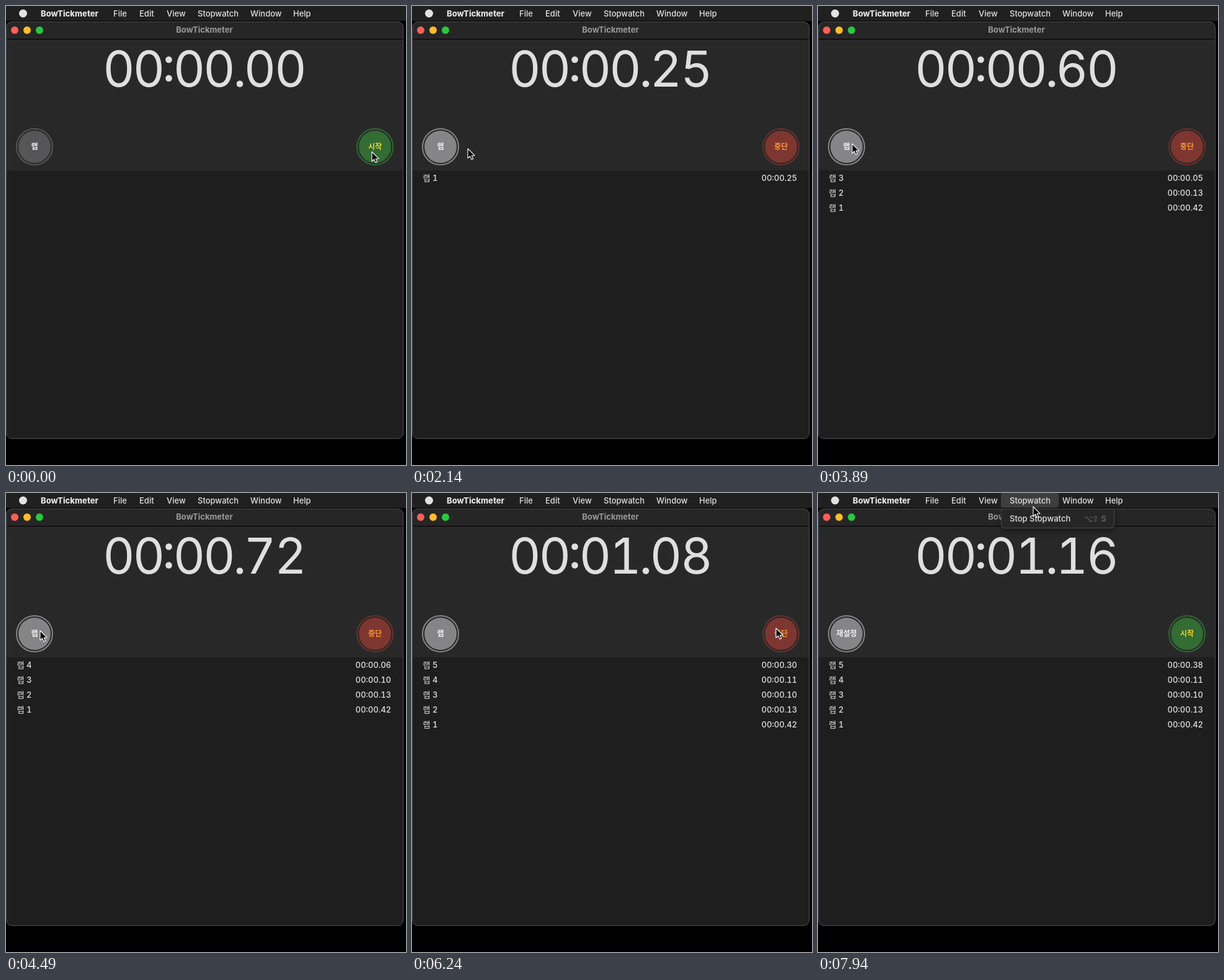
These frames come from a looping animation (645 by 740 pixels, 7990 ms). An HTML page:

```html
<!DOCTYPE html>
<html lang="ko">
<head>
<meta charset="utf-8">
<title>Stopwatch</title>
<style>
  html, body { margin: 0; width: 100%; height: 100%; overflow: hidden; background: #000; }
  svg { display: block; width: 100vw; height: 100vh; }
  text { font: 500 13px Inter, "Noto Sans CJK KR", "Noto Sans CJK", sans-serif; fill: #e2e2e2;
    font-feature-settings: "tnum"; white-space: pre; }
  .bold { font-weight: 800; }
  .title { font-weight: 700; fill: #9a9a9a; text-anchor: middle; }
  .digit { font-size: 80px; font-weight: 400; fill: #dfdfdf; text-anchor: middle; }
  .label { font: 700 12px "Noto Sans CJK KR", "Noto Sans CJK", sans-serif; text-anchor: middle; }
  .end { text-anchor: end; }
  .keys { font-family: "DejaVu Sans", sans-serif; fill: #6c6c6c; }
</style>
</head>
<body>
<svg id="stage" viewBox="0 0 645 740" xmlns="http://www.w3.org/2000/svg">
  <defs>
    <clipPath id="frame"><rect y="25" width="641" height="673" rx="10"/></clipPath>
    <filter id="shadow" x="-20%" y="-50%" width="140%" height="250%">
      <feDropShadow dx="0" dy="5" stdDeviation="6" flood-opacity=".4"/>
    </filter>
  </defs>
  <rect width="645" height="740"/>
  <rect width="645" height="24" fill="#202020"/>
  <g clip-path="url(#frame)">
    <rect y="25" width="641" height="673" fill="#1e1e1e"/>
    <rect y="25" width="641" height="240" fill="#282828"/>
    <rect y="25" width="641" height="28" fill="#262626"/>
    <rect y="53" width="641" height="1" fill="#000"/>
  </g>
  <rect x=".5" y="25.5" width="640" height="672" rx="9.5" fill="none" stroke="#4d4d4d"/>
  <circle cx="14" cy="39" r="6" fill="#ff5f57"/>
  <circle cx="34" cy="39" r="6" fill="#febc2e"/>
  <circle cx="54" cy="39" r="6" fill="#28c840"/>
  <text class="title" x="320" y="43">BowTickmeter</text>
  <g fill="#dfdfdf">
    <circle cx="262.5" cy="86.5" r="5.3"/>
    <circle cx="262.5" cy="116.5" r="5.3"/>
    <circle cx="377" cy="125.5" r="5.3"/>
  </g>
  <g id="clock"></g>
  <g id="buttons"></g>
  <g id="rows"></g>
  <rect id="glow" x="295" y="0" width="93" height="24" rx="4" fill="#3e3e3e"/>
  <g id="bar"><circle cx="27.5" cy="12" r="6.5" fill="#e2e2e2"/></g>
  <g id="menu">
    <path d="M295.5 25.5H477.5V50.5Q477.5 56.5 471.5 56.5H301.5Q295.5 56.5 295.5 50.5Z"
      fill="#272727" stroke="#4c4c4c" filter="url(#shadow)"/>
    <text x="309" y="46">Stop Stopwatch</text>
    <text class="keys" x="429" y="46">⌥</text>
    <text class="keys" x="442" y="46">⇧</text>
    <text x="456.5" y="46" style="fill:#6c6c6c">S</text>
  </g>
  <path id="cursor" d="M0 0V15.4L3.5 12.2L6 17.6L8.6 16.4L6.2 11.2H11Z"
    fill="#000" stroke="#fff" stroke-width="1.1" stroke-linejoin="round"/>
</svg>
<script>
const LOOP = 7990, START = 790, STOP = 6690, MENU = 7640;
const $ = id => document.getElementById(id);

function add(parent, tag, attrs, text = "") {
  const el = document.createElementNS("http://www.w3.org/2000/svg", tag);
  for (const k in attrs) el.setAttribute(k, attrs[k]);
  el.textContent = text;
  return parent.appendChild(el);
}

[["BowTickmeter", 56], ["File", 173], ["Edit", 215], ["View", 259],
 ["Stopwatch", 309], ["Window", 394], ["Help", 463]].forEach(([name, x], i) =>
  add($("bar"), "text", { x, y: 17, class: i ? "" : "bold" }, name));

const digits = [182, 230.5, 295.5, 344, 409.5, 459].map(x =>
  add($("clock"), "text", { x, y: 130.3, class: "digit" }));

function makeButton(cx) {
  const g = add($("buttons"), "g", {});
  const ring = add(g, "circle", { cx, cy: 227, r: 29, fill: "none", "stroke-width": 2 });
  const disc = add(g, "circle", { cx, cy: 227, r: 26 });
  const label = add(g, "text", { x: cx, y: 231.3, class: "label" });
  return (text, fill, edge, ink, pressed) => {
    ring.setAttribute("stroke", edge);
    disc.setAttribute("fill", fill);
    label.style.fill = ink;
    label.textContent = text;
    g.style.filter = pressed ? "brightness(1.2)" : "none";
  };
}
const left = makeButton(46), right = makeButton(595);

// Lap start and closing value, in hundredths
const laps = [[0, 42], [42, 13], [55, 10], [66, 11], [78, 38]];
const rows = laps.map((_, i) => {
  const g = add($("rows"), "g", {});
  add(g, "text", { x: 17.5, y: 282 }, "랩 " + (i + 1));
  return { g, value: add(g, "text", { x: 621, y: 282, class: "end" }) };
});

// [time, hundredths]
const ticks = [[890, 0], [2140, 25], [3320, 49], [4490, 72], [5240, 87], [6240, 108], [6640, 116]];

const ease = {
  both: p => p * p * (3 - 2 * p),
  in: p => p * p,
  out: p => 1 - (1 - p) * (1 - p),
  hold: p => p < 1 ? 0 : 1
};
// [time, x, y, easing towards this point]
const path = [
  [0, 590, 235], [1040, 590, 235, "hold"], [2140, 90, 230, "both"], [2440, 55, 222, "out"],
  [4840, 55, 222, "hold"], [5240, 132, 239, "in"], [6040, 587, 218, "out"],
  [6690, 587, 218, "hold"], [6790, 587, 208, "both"], [7140, 587, 208, "hold"],
  [7740, 343, 10, "both"], [7940, 347, 22, "hold"], [LOOP, 347, 22, "hold"]
];

function segment(keys, t) {
  let i = 1;
  while (i < keys.length - 1 && t >= keys[i][0]) i++;
  const a = keys[i - 1], b = keys[i];
  return [a, b, Math.min(1, Math.max(0, (t - a[0]) / (b[0] - a[0])))];
}

function countAt(t) {
  const [a, b, p] = segment(ticks, t);
  return Math.floor(a[1] + (b[1] - a[1]) * p + 0.001);
}

const two = n => String(n).padStart(2, "0");
const parts = n => [Math.floor(n / 6000), Math.floor(n / 100) % 60, n % 100].map(two);

function draw(t) {
  const n = countAt(t), running = t >= START && t < STOP;
  const clock = parts(n).join("");
  digits.forEach((d, i) => d.textContent = clock[i]);

  const shown = t < START ? 0 : laps.filter(l => n >= l[0]).length;
  rows.forEach(({ g, value }, i) => {
    g.style.display = i < shown ? "" : "none";
    g.setAttribute("transform", `translate(0 ${(shown - 1 - i) * 24})`);
    const [m, s, c] = parts(Math.max(0, Math.min(n - laps[i][0], laps[i][1])));
    value.textContent = `${m}:${s}.${c}`;
  });

  const lapSoon = running && laps.some((l, i) => i && n < l[0] && n >= l[0] - 2);
  const grey = t < START ? "#565658" : "#858587";
  left(t >= STOP ? "재설정" : "랩", grey, grey, "#f0f0f0", lapSoon);
  if (running) right("중단", "#7e3630", "#6c302d", "#f99a35", t >= STOP - 100);
  else right("시작", "#336c35", "#2f6a33", "#f5d22b", t >= 540 && t < START);

  const open = t >= MENU ? "" : "none";
  $("glow").style.display = $("menu").style.display = open;

  const step = Math.max(0, Math.floor((t + 10) / 50) * 50 - 10);
  const [a, b, p] = segment(path, step);
  const q = ease[b[3]](p);
  const [x, y] = [1, 2].map(k => a[k] + (b[k] - a[k]) * q);
  $("cursor").setAttribute("transform", `translate(${x.toFixed(1)} ${y.toFixed(1)})`);
}

function loop() {
  draw(performance.now() % LOOP);
  requestAnimationFrame(loop);
}
loop();
</script>
</body>
</html>
```
